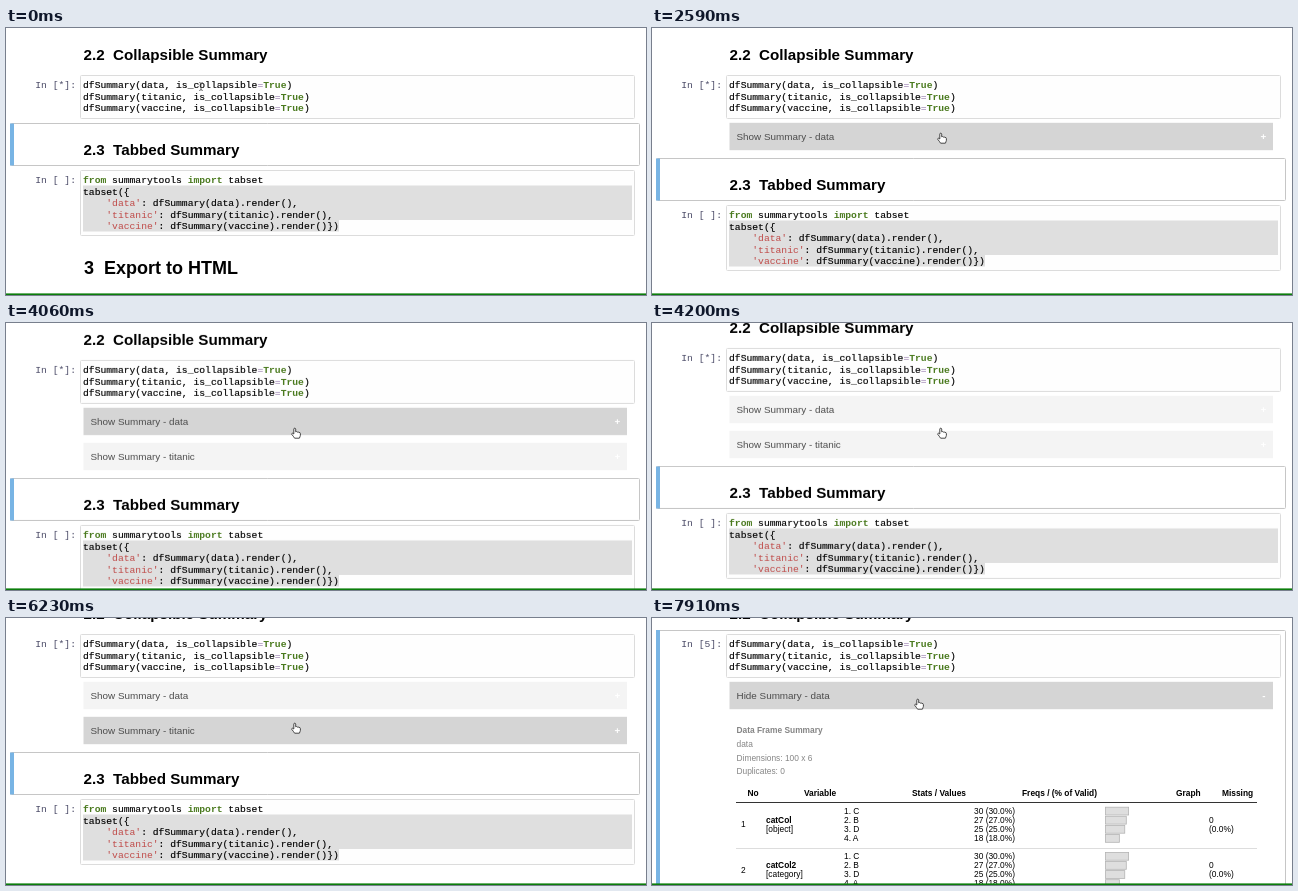
Animation, 640 px wide and 267 px high, one loop 8000 ms. Source, as an HTML page:

```html
<!DOCTYPE html>
<html lang="en">
<head>
<meta charset="utf-8">
<title>Collapsible summary</title>
<style>
html, body { margin: 0; width: 100%; height: 100%; overflow: hidden; background: #fff; }
svg { display: block; width: 640px; height: 267px; }
text { font-family: "Liberation Sans", Arial, sans-serif; white-space: pre; }
.h2 { font-size: 15.2px; font-weight: bold; }
.h1 { font-size: 18px; font-weight: bold; }
.code text { font: 9.7px "Liberation Mono", "Courier New", monospace; stroke: #000; stroke-width: .15px; }
.code .prompt { fill: #4a4a66; stroke: none; text-anchor: end; }
.code .kw { fill: #4a7a1e; stroke: none; font-weight: bold; }
.code .op { fill: #9a80b0; stroke: none; }
.code .str { fill: #bf4a48; stroke: none; }
.box { fill: #fefefe; stroke: #dcdcdc; }
.sel { fill: #dfdfdf; }
.frame { fill: none; stroke: #c6c6c6; }
.edge { fill: #78b4e4; }
.row text { font-size: 9.9px; fill: #4c4c4c; }
.row .sign { font-weight: bold; fill: #fff; text-anchor: middle; }
.row rect { fill: #f4f4f4; }
#panel text { font-size: 8.4px; }
#panel .meta { fill: #858585; }
#panel .b { font-weight: bold; }
#panel .end { text-anchor: end; }
.bar { fill: #dedede; stroke: #b4b4b4; stroke-width: .8; }

/* hard switches */
#data, #titanic, #vaccine, #below, #hover1, #hover2, .busy, .done, .shut, .open,
#pick1, #pick2, #beam, #hand { animation: 8s step-end infinite; }
#data { animation-name: data; }
#titanic { animation-name: titanic; }
#vaccine, .done { animation-name: finish; }
.busy { animation-name: busy; }
#below { animation-name: below; }
#hover1 { animation-name: hover1; }
#hover2 { animation-name: hover2; }
.shut, #pick2 { animation-name: shut; }
.open, #pick1 { animation-name: open; }
#beam { animation-name: beam; }
#hand { animation-name: hand; }
@keyframes data { 0% { opacity: 0 } 4.375%, 100% { opacity: 1 } }
@keyframes titanic { 0% { opacity: 0 } 34.125%, 100% { opacity: 1 } }
@keyframes finish { 0% { opacity: 0 } 80.5%, 100% { opacity: 1 } }
@keyframes busy { 0% { opacity: 1 } 80.5%, 100% { opacity: 0 } }
@keyframes below {
  0% { transform: none }
  4.375% { transform: translateY(35px) }
  34.125% { transform: translateY(70px) }
  80.5%, 100% { transform: translateY(105px) }
}
@keyframes hover1 {
  0% { fill: #f4f4f4 }
  23.25% { fill: #d5d5d5 }
  51.6% { fill: #f4f4f4 }
  85.5%, 100% { fill: #d5d5d5 }
}
@keyframes hover2 {
  0% { fill: #f4f4f4 }
  52.9% { fill: #d5d5d5 }
  84.25%, 100% { fill: #f4f4f4 }
}
@keyframes shut { 0% { opacity: 1 } 92.75%, 100% { opacity: 0 } }
@keyframes open { 0% { opacity: 0 } 92.75%, 100% { opacity: 1 } }
@keyframes beam { 0% { opacity: 1 } 23.25%, 100% { opacity: 0 } }
@keyframes hand { 0% { opacity: 0 } 23.25%, 100% { opacity: 1 } }

/* smooth motion */
#page { animation: scroll 8s linear infinite; }
#push { animation: push 8s ease-out infinite; }
#cursor { animation: cursor 8s ease-in-out infinite; }
@keyframes scroll {
  0%, 46.375% { transform: none }
  50.75% { transform: translateY(-10px) }
  52.5% { transform: translateY(-22px) }
  54.25%, 100% { transform: translateY(-31px) }
}
@keyframes push {
  0%, 92.75% { transform: none }
  95.25%, 100% { transform: translateY(300px) }
}
@keyframes cursor {
  0%, 20.125% { transform: translate(195px, 54px) }
  25.375%, 83.125% { transform: translate(289px, 105px) }
  86.875%, 100% { transform: translate(266px, 81px) }
}
</style>
</head>
<body>
<svg viewBox="0 0 640 267">
  <g id="page">
    <text class="h2" x="77.5" y="32.3">2.2&#160;&#160;Collapsible Summary</text>
    <g class="code">
      <rect class="box" x="74.5" y="47.5" width="554" height="43" rx="1"/>
      <text class="prompt busy" x="70" y="60.3">In [*]:</text>
      <text class="prompt done" x="70" y="60.3">In [5]:</text>
      <g id="calls"></g>
    </g>

    <g id="panel">
      <text class="meta b" x="84.5" y="146">Data Frame Summary</text>
      <text class="meta" x="84.5" y="160">data</text>
      <text class="meta" x="84.5" y="173.5">Dimensions: 100 x 6</text>
      <text class="meta" x="84.5" y="187">Duplicates: 0</text>
      <path d="M84 215.5H605" stroke="#333"/>
      <path d="M84 261.5H605" stroke="#ddd"/>
    </g>

    <g id="push">
      <rect x="0" y="122.5" width="640" height="500" fill="#fff"/>
      <g id="titanic" class="row">
        <rect id="hover2" x="77.5" y="129.8" width="543.5" height="27.4"/>
        <text x="84.5" y="147.3">Show Summary - titanic</text>
        <text class="sign" x="611.5" y="147.3">+</text>
      </g>
      <g id="vaccine" class="row">
        <rect x="77.5" y="164.8" width="543.5" height="27.4"/>
        <text x="84.5" y="182.3">Show Summary - vaccine</text>
        <text class="sign" x="611.5" y="182.3">+</text>
      </g>
      <g id="below">
        <g id="pick2">
          <rect class="frame" x="4.5" y="95.5" width="629" height="42" rx="1"/>
          <rect class="edge" x="4" y="95.5" width="4" height="42"/>
        </g>
        <text class="h2" x="77.5" y="126.5">2.3&#160;&#160;Tabbed Summary</text>
        <g class="code">
          <rect class="box" x="74.5" y="142.5" width="554" height="65" rx="1"/>
          <path class="sel" d="M77 157.5H626V192H333V203.5H77Z"/>
          <text class="prompt" x="70" y="155.2">In [ ]:</text>
          <text x="77" y="155.2"><tspan class="kw">from</tspan> summarytools <tspan class="kw">import</tspan> tabset</text>
          <text x="77" y="166.7">tabset({</text>
          <g id="tabs"></g>
        </g>
        <text class="h1" x="78" y="246.3">3&#160;&#160;Export to HTML</text>
      </g>
    </g>

    <g id="data" class="row">
      <rect id="hover1" x="77.5" y="94.8" width="543.5" height="27.4"/>
      <text class="shut" x="84.5" y="112.3">Show Summary - data</text>
      <text class="open" x="84.5" y="112.3">Hide Summary - data</text>
      <text class="sign shut" x="611.5" y="112.3">+</text>
      <text class="sign open" x="612" y="112.3">-</text>
    </g>
    <g id="pick1">
      <rect class="frame" x="4.5" y="43.5" width="629" height="457" rx="1"/>
      <rect class="edge" x="4" y="43" width="4" height="458"/>
    </g>
  </g>

  <rect y="265.4" width="640" height="1.6" fill="#0b7d0b"/>

  <g id="cursor">
    <path id="beam" d="M-1.8 .5Q0 .5 0 1.8Q0 .5 1.8 .5M0 1.5V7.5M-1.8 8.5Q0 8.5 0 7.2Q0 8.5 1.8 8.5" fill="none" stroke="#555" stroke-width=".8"/>
    <path id="hand" d="M-1.2 6V1.1Q-1.2 .2 -.3 .2T.7 1.1V3.8Q1.7 3.2 2.3 4.1Q3.4 3.6 3.9 4.5Q5.3 4.2 5.4 5.5V7.4Q5 8.8 4.4 10.2H-.4Q-1.6 8.3 -3.2 6.4Q-3.5 5.3 -2.4 5.2Z" fill="#fff" stroke="#333" stroke-width=".9" stroke-linejoin="round"/>
  </g>
</svg>
<script>
const $ = id => document.getElementById(id);
const label = (x, y, s, cls = "") => `<text x="${x}" y="${y}" class="${cls}">${s}</text>`;
const span = (cls, s) => `<tspan class="${cls}">${s}</tspan>`;
const names = ["data", "titanic", "vaccine"];

$("calls").innerHTML = names.map((n, i) => label(77, 60.3 + i * 11.5,
  `dfSummary(${n}, is_collapsible${span("op", "=")}${span("kw", "True")})`)).join("");

$("tabs").innerHTML = names.map((n, i) => label(77, 178.2 + i * 11.5,
  `    ${span("str", `'${n}'`)}: dfSummary(${n}).render()${i < 2 ? "," : "})"}`)).join("");

const heads = [[95.5, "No"], [152, "Variable"], [260, "Stats / Values"],
  [370, "Freqs / (% of Valid)"], [524, "Graph"], [570, "Missing"]];
const levels = [["C", 30], ["B", 27], ["D", 25], ["A", 18]];

function tableRow(no, name, type, y) {
  const cells = label(89, y + 13.5, no) + label(114, y + 9, name, "b") + label(114, y + 18, `[${type}]`)
    + label(557, y + 9, "0") + label(557, y + 18, "(0.0%)");
  return cells + levels.map(([key, n], i) => {
    const ly = y + i * 9.1;
    return label(192, ly, `${i + 1}. ${key}`) + label(363, ly, `${n} (${n}.0%)`, "end")
      + `<rect class="bar" x="453.5" y="${ly - 6.6}" width="${n * .77}" height="7.8"/>`;
  }).join("");
}

$("panel").insertAdjacentHTML("beforeend",
  heads.map(([x, s]) => label(x, 209, s, "b")).join("")
  + tableRow(1, "catCol", "object", 226.8)
  + tableRow(2, "catCol2", "category", 272));
</script>
</body>
</html>
```
